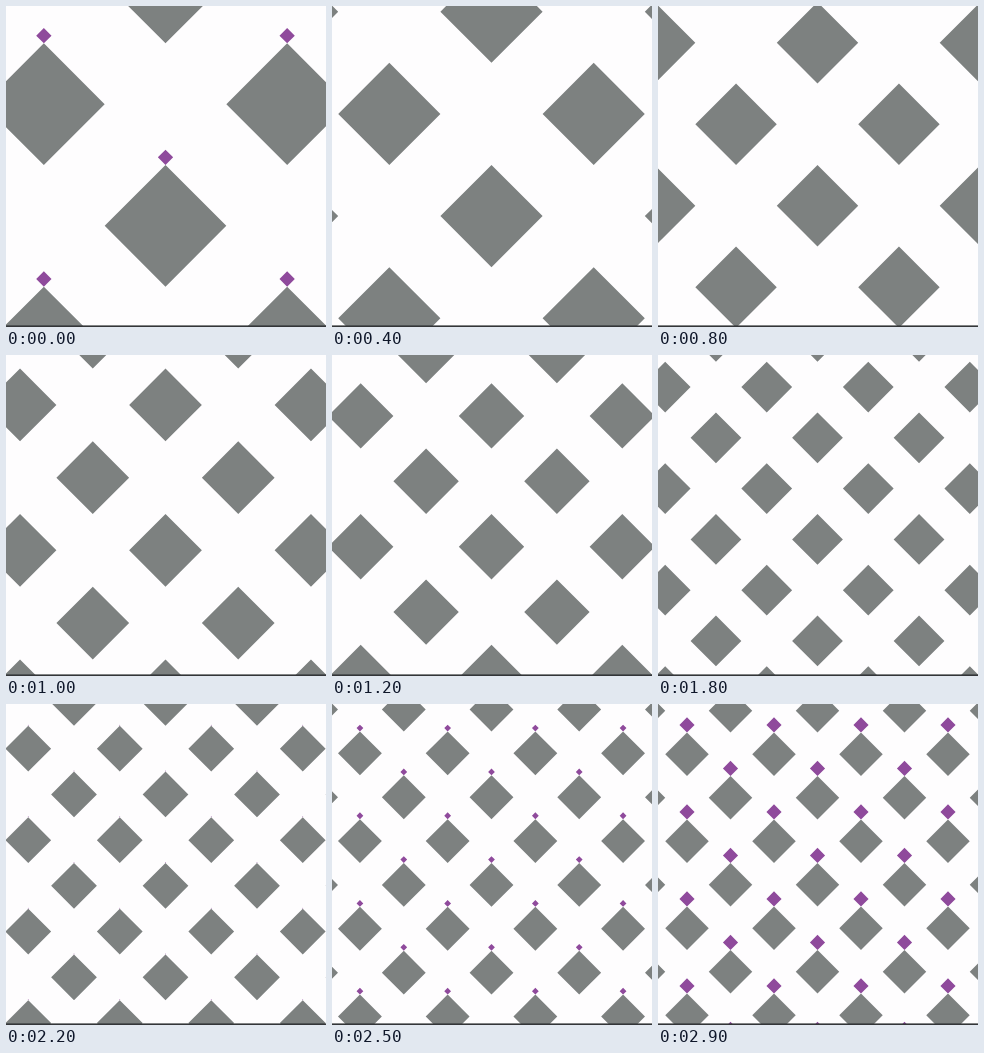
Animation of 320 by 321 pixels, one loop 3000 ms. Source, as an HTML page with a canvas:

```html
<!DOCTYPE html>
<html lang="en">
<head>
<meta charset="utf-8">
<title>Diamond lattice</title>
<style>
  html, body { margin: 0; width: 100%; height: 100%; overflow: hidden; background: #fefdfe; }
  canvas { display: block; width: 320px; height: 321px; }
</style>
</head>
<body>
<canvas id="stage" width="320" height="321"></canvas>
<script>
const ctx = document.getElementById('stage').getContext('2d');
const W = 320, H = 321, LOOP = 3000, STEP = 100;
const CX = 159.5, CY = 159;

// Adds a diamond with its top corner at (x, y).
function diamond(x, y, size) {
  const r = size / 2;
  ctx.moveTo(x, y);
  ctx.lineTo(x + r, y + r);
  ctx.lineTo(x, y + size);
  ctx.lineTo(x - r, y + r);
  ctx.closePath();
}

// Fills one diamond per lattice point, shifted up by `lift`.
function lattice(gap, size, lift, color) {
  const n = Math.ceil(W / 2 / gap) + 1;
  ctx.fillStyle = color;
  ctx.beginPath();
  for (let i = -n; i <= n; i++) {
    for (let j = -n; j <= n; j++) {
      if ((i + j) % 2 === 0) diamond(CX + i * gap, CY + j * gap - lift, size);
    }
  }
  ctx.fill();
}

function draw(ms) {
  const phase = 1.02 * ms / 1000 - 1.244;
  const gap = 1000 / (15.442 + 7.625 * Math.sin(phase));
  const small = gap * (0.28 - 0.48 * Math.cos(phase));

  ctx.fillStyle = '#fefdfe';
  ctx.fillRect(0, 0, W, H);
  lattice(gap, gap, 0, '#7d8180');
  if (small > 0) lattice(gap, small, small, '#8f4a9c');
  ctx.fillStyle = '#333538';
  ctx.fillRect(0, 319.4, W, 1.6);
}

const start = performance.now();
function tick() {
  const t = (performance.now() - start) % LOOP;
  draw(Math.floor(t / STEP) * STEP);
  requestAnimationFrame(tick);
}
tick();
</script>
</body>
</html>
```
